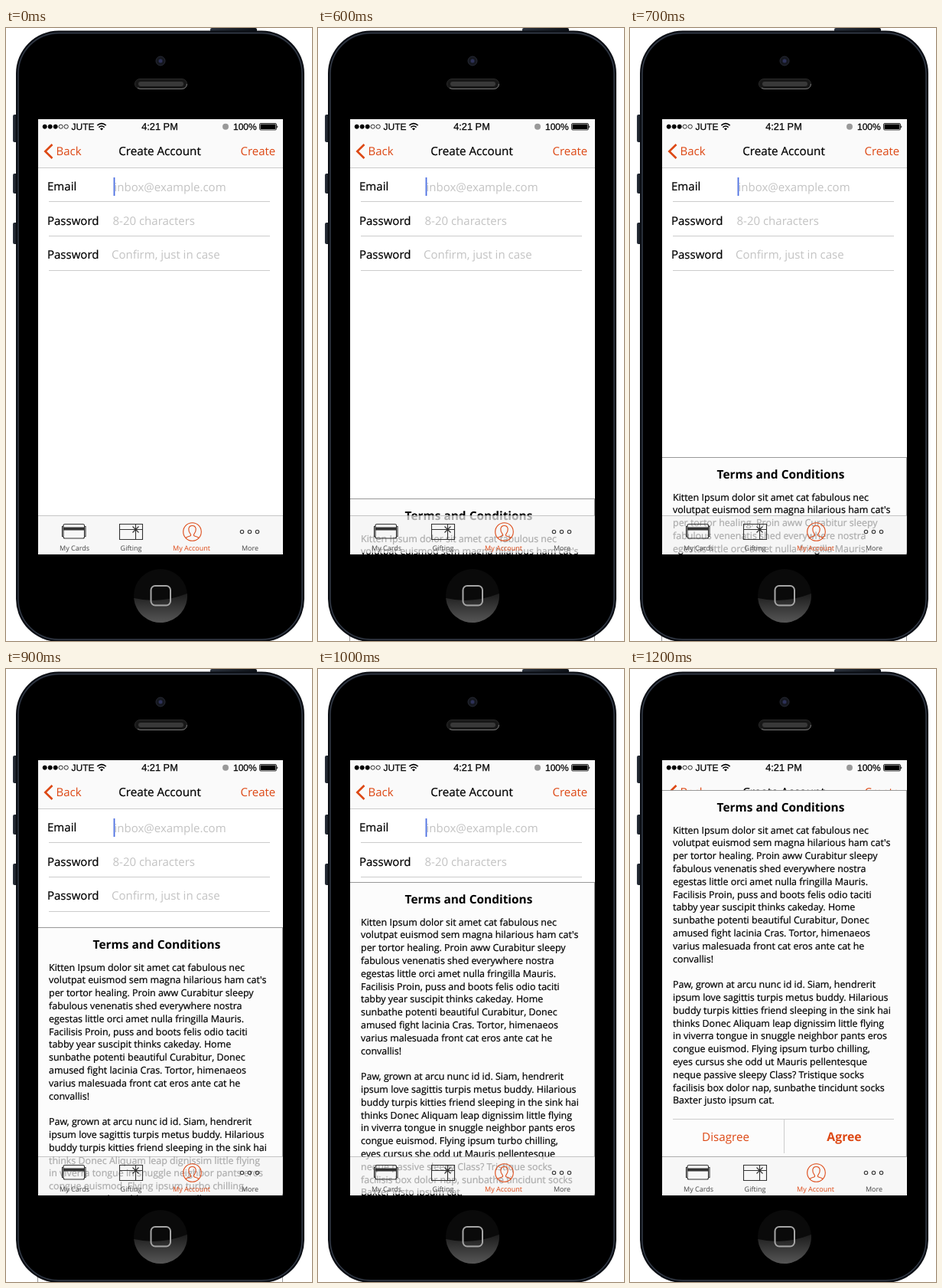
These frames come from a looping animation (400 by 800 pixels, 1700 ms). An HTML page:

```html
<!DOCTYPE html>
<html lang="en">
<head>
<meta charset="utf-8">
<title>Create account</title>
<style>
  html, body { margin: 0; width: 100%; height: 100%; overflow: hidden; background: #fff; }
  svg { display: block; width: 400px; height: 800px; }
  text { font-family: "Open Sans", "Noto Sans", sans-serif; font-size: 15px; text-rendering: geometricPrecision; }
  .status text { font-family: "Liberation Sans", Arial, sans-serif; font-size: 12px; stroke: #000; stroke-width: .25; }
  .status .clock { font-size: 12.8px; }
  .label, #terms text { stroke: #000; stroke-width: .22; }
  .hint { fill: #c3c3c3; }
  .accent { fill: #dd4814; }
  .bold { font-weight: 700; font-size: 15.44px; }
  .mid { text-anchor: middle; }
  .rule { stroke: #ccc; }
  .tabs text { font-size: 9px; fill: #444; text-anchor: middle; }
  .tabs text.accent { fill: #dd4814; }
  .icon { fill: none; stroke: #333; stroke-width: 1.1; }
  #terms text { font-size: 12.46px; }
  #panel .button { font-size: 15.2px; }
</style>
</head>
<body>
<svg viewBox="0 0 400 800">
  <defs>
    <linearGradient id="gloss" x2="0" y2="1">
      <stop offset="0" stop-color="#1c1c1c"/>
      <stop offset="1" stop-color="#565656"/>
    </linearGradient>
    <linearGradient id="key">
      <stop offset="0" stop-color="#2b323d"/>
      <stop offset="1" stop-color="#0c1016"/>
    </linearGradient>
  </defs>

  <rect x="41" y="119" width="321" height="63" fill="#fafafa"/>
  <path class="rule" d="M41 182.5H362M56 226.5H345M56 271.5H345M56 316.5H345"/>

  <g class="status">
    <g stroke="#000" stroke-width=".8">
      <circle cx="50.7" cy="128.7" r="2.6"/>
      <circle cx="57.7" cy="128.7" r="2.6"/>
      <circle cx="64.7" cy="128.7" r="2.6"/>
      <circle cx="71.7" cy="128.7" r="2.6" fill="none"/>
      <circle cx="78.7" cy="128.7" r="2.6" fill="none"/>
    </g>
    <text x="85.5" y="133">JUTE</text>
    <path d="M119.3 127.2Q125 122.2 130.7 127.2M121.4 129.6Q125 126.4 128.6 129.6" fill="none" stroke="#000" stroke-width="1.6"/>
    <path d="M123 131.4Q125 129.8 127 131.4L125 133.5Z"/>
    <text class="clock mid" x="201" y="133">4:21 PM</text>
    <circle cx="287" cy="128.8" r="4" fill="#999"/>
    <text x="297" y="133">100%</text>
    <rect x="331.5" y="124.5" width="22" height="8.5" rx="1.5" fill="none" stroke="#000" stroke-width=".8"/>
    <path d="M332.5 125.5H352.5V132H332.5ZM354.3 127.2Q356.4 128.8 354.3 130.4Z"/>
  </g>

  <path d="M60.5 152L51.3 161L60.5 170" fill="none" stroke="#dd4814" stroke-width="2.6"/>
  <text class="accent" x="65.5" y="166">Back</text>
  <text class="label mid" x="201" y="166" style="font-size:15.2px">Create Account</text>
  <text class="accent" x="306.5" y="166">Create</text>

  <text class="label" x="54" y="212">Email</text>
  <text class="label" x="54" y="256.5">Password</text>
  <text class="label" x="54" y="300.5">Password</text>
  <text class="hint" x="141.5" y="212.5">inbox@example.com</text>
  <text class="hint" x="139.5" y="256.5">8-20 characters</text>
  <text class="hint" x="138" y="300.5">Confirm, just in case</text>
  <path d="M141.5 195V219" stroke="#4a6ee0" stroke-width="1.8"/>

  <g id="panel">
    <rect x="41.5" y=".5" width="320" height="478" fill="#fcfcfc" stroke="#999"/>
    <text class="bold mid" x="197" y="28">Terms and Conditions</text>
    <g id="terms"></g>
    <path class="rule" d="M56 429.5H345M201.5 429.5V474"/>
    <text class="button accent mid" x="125" y="458">Disagree</text>
    <text class="button accent bold mid" x="280" y="458" style="font-size:15.8px">Agree</text>
  </g>

  <g class="tabs">
    <rect x="41" y="636" width="321" height="49" fill="#f4f4f4" fill-opacity=".7"/>
    <path d="M41 636.5H362" stroke="#000" stroke-opacity=".2"/>
    <rect class="icon" x="75" y="647.5" width="27.5" height="18.5" rx="2"/>
    <path class="icon" d="M75 650.5H73.5V663.5H75M102.5 650.5H104V663.5H102.5"/>
    <path d="M75 651.5H102.5V655.5H75Z" fill="#333"/>
    <path class="icon" d="M148.5 647.5H178.5V667.5H148.5ZM148.5 654.5H178.5M169.5 647.5V667.5M165.5 650.5L173.5 658.5M173.5 650.5L165.5 658.5"/>
    <g class="icon" style="stroke:#dd4814">
      <circle cx="243.5" cy="657.5" r="11.8"/>
      <path d="M235 665.5Q236.5 664 240.5 663Q242.3 662 241 660.2Q238.5 657.5 238.8 653.5Q239.5 649.5 243.5 649.5Q247.5 649.5 248.2 653.5Q248.5 657.5 246 660.2Q244.7 662 246.5 663Q250.5 664 252 665.5"/>
    </g>
    <g class="icon">
      <circle cx="308.5" cy="657.5" r="2.2"/>
      <circle cx="318.5" cy="657.5" r="2.2"/>
      <circle cx="328.5" cy="657.5" r="2.2"/>
    </g>
    <text x="89.5" y="682">My Cards</text>
    <text x="163.5" y="682">Gifting</text>
    <text class="accent" x="242.5" y="682">My Account</text>
    <text x="319" y="682">More</text>
  </g>

  <g fill="url(#key)">
    <rect x="9" y="113" width="7" height="36" rx="2"/>
    <rect x="9" y="190" width="7" height="26" rx="2"/>
    <rect x="9" y="254" width="7" height="28" rx="2"/>
    <rect x="267" y="0" width="61" height="7" rx="2"/>
  </g>
  <path fill="#0b0e14" fill-rule="evenodd" d="M69 3.5H334A56 56 0 0 1 390 59.5V745A56 56 0 0 1 334 801H69A56 56 0 0 1 13 745V59.5A56 56 0 0 1 69 3.5ZM42 119V687H362V119Z"/>
  <rect x="16" y="6.5" width="371" height="791.5" rx="53" fill="none" stroke="#343b47" stroke-width="1.4"/>
  <path fill-rule="evenodd" d="M69 8H334A52 52 0 0 1 386 60V745A52 52 0 0 1 334 797H69A52 52 0 0 1 17 745V60A52 52 0 0 1 69 8ZM42 119V687H362V119Z"/>

  <circle cx="202" cy="43" r="6" fill="#15171f" stroke="#272a33"/>
  <circle cx="202" cy="43" r="2.5" fill="#2d3158"/>
  <rect x="168.5" y="66.5" width="68" height="13" rx="6.5" fill="#171717" stroke="#2b2b2b"/>
  <path d="M172 78Q174 79.5 176 79.5H229Q236 79.5 236.5 73" fill="none" stroke="#777"/>
  <rect x="173" y="70" width="59" height="6" rx="3" fill="#393939"/>
  <circle cx="202" cy="741" r="35" fill="#0a0a0a"/>
  <path d="M167.1 744Q202 752 236.9 738A35 35 0 0 1 167.1 744Z" fill="url(#gloss)"/>
  <rect x="189.5" y="728" width="25.5" height="25.5" rx="5.5" fill="none" stroke="#a5a5a5" stroke-width="2"/>
</svg>
<script>
const terms = `Kitten Ipsum dolor sit amet cat fabulous nec
volutpat euismod sem magna hilarious ham cat's
per tortor healing. Proin aww Curabitur sleepy
fabulous venenatis shed everywhere nostra
egestas little orci amet nulla fringilla Mauris.
Facilisis Proin, puss and boots felis odio taciti
tabby year suscipit thinks cakeday. Home
sunbathe potenti beautiful Curabitur, Donec
amused fight lacinia Cras. Tortor, himenaeos
varius malesuada front cat eros ante cat he
convallis!

Paw, grown at arcu nunc id id. Siam, hendrerit
ipsum love sagittis turpis metus buddy. Hilarious
buddy turpis kitties friend sleeping in the sink hai
thinks Donec Aliquam leap dignissim little flying
in viverra tongue in snuggle neighbor pants eros
congue euismod. Flying ipsum turbo chilling,
eyes cursus she odd ut Mauris pellentesque
neque passive sleepy Class? Tristique socks
facilisis box dolor nap, sunbathe tincidunt socks
Baxter justo ipsum cat.`;

document.getElementById('terms').innerHTML = terms.split('\n')
  .map((line, i) => `<text x="56" y="${56.5 + i * 16.8}">${line}</text>`).join('');

const LOOP = 1700, SLIDE_START = 500, STEP = 100;
const panelTops = [652, 614, 560, 452, 337, 278, 189, 158];
const panel = document.getElementById('panel');

function draw(now) {
  const time = now % LOOP;
  const step = Math.floor((time - SLIDE_START) / STEP);
  const top = step < 0 ? 800 : panelTops[Math.min(step, panelTops.length - 1)];
  panel.setAttribute('transform', `translate(0 ${top})`);
}

const start = performance.now();
function tick() {
  draw(performance.now() - start);
  requestAnimationFrame(tick);
}
tick();
</script>
</body>
</html>
```
